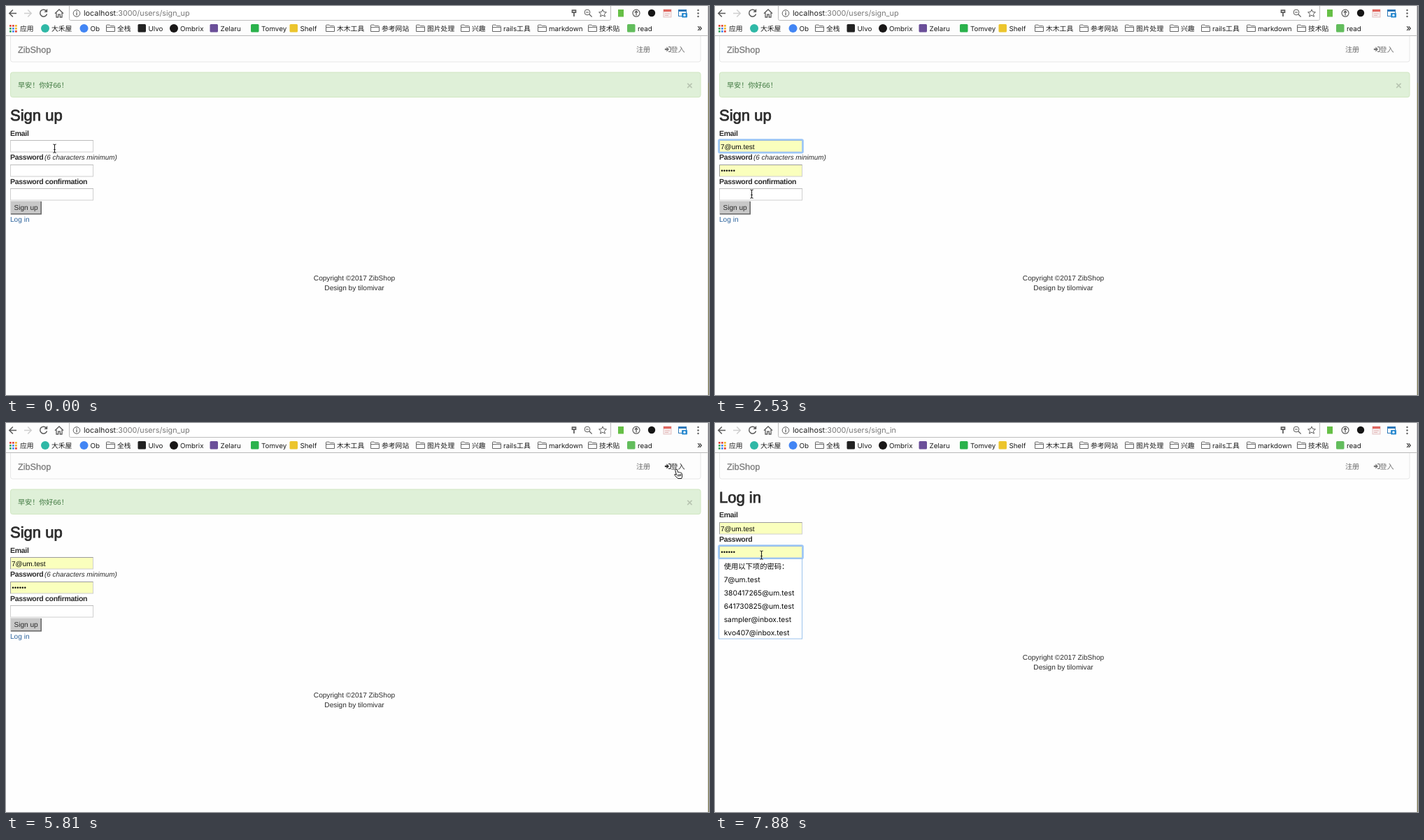
An HTML page that plays this animation: 1005x557 px, repeating every 8 s.

```html
<!DOCTYPE html>
<html lang="zh-CN">
<head>
<meta charset="utf-8">
<title>Sign up and log in</title>
<style>
  html, body { margin: 0; width: 100%; height: 100%; overflow: hidden; background: #fefefe; }
  svg { display: block; width: 100%; height: 100%; }
  text { font-family: "Liberation Sans", "Noto Sans CJK SC", "Noto Sans CJK", sans-serif; font-size: 10.1px; fill: #2b2b2b; white-space: pre; text-rendering: geometricPrecision; }
  .ui { font-family: Inter, "Noto Sans CJK SC", "Noto Sans CJK", sans-serif; font-size: 9.8px; fill: #1a1a1a; }
  .url { font-size: 10.8px; fill: #777; }
  .menu { font-size: 10.3px; fill: #0a0a0a; }
  .bold { font-weight: 700; }
  .label { font-weight: 700; font-size: 10.5px; letter-spacing: -.28px; }
  .hint { font-style: italic; font-size: 9.9px; }
  .title { font-size: 22px; stroke: #2b2b2b; stroke-width: .8px; }
  .brand { font-size: 12.7px; fill: #777; stroke: #777; stroke-width: .25px; }
  .link { fill: #2c639c; }
  .field { font-size: 10px; fill: #0a0a0a; }
</style>
</head>
<body>
<svg viewBox="0 0 1005 557" xmlns="http://www.w3.org/2000/svg">
  <g id="page"></g>
  <g id="chrome"></g>
  <g id="url"></g>
  <g id="overlay"></g>
</svg>
<script>
const LOOP = 8000;
const SHOP = 'ZibShop';
const USERS = ['7@um.test', '380417265@um.test', '641730825@um.test', 'sampler@inbox.test', 'kvo407@inbox.test'];

const rect = (x, y, w, h, fill, extra = '') =>
  `<rect x="${x}" y="${y}" width="${w}" height="${h}" fill="${fill}" ${extra}/>`;
const circle = (x, y, r, fill, extra = '') =>
  `<circle cx="${x}" cy="${y}" r="${r}" fill="${fill}" ${extra}/>`;
const line = (d, color, width = 1, fill = 'none') =>
  `<path d="${d}" fill="${fill}" stroke="${color}" stroke-width="${width}"/>`;
const text = (x, y, str, cls = '', extra = '') =>
  `<text x="${x}" y="${y}" class="${cls}" ${extra}>${str}</text>`;
const centred = (y, str) => text(498, y, str, '', 'text-anchor="middle"');

// ---- Browser frame ----
const BOOKMARKS = [
  [5, 'apps', '应用'], [50, 'round #2fb8a6', '大禾屋'], [105.5, 'round #4285f4', 'Ob'],
  [143, 'folder', '全栈'], [188.5, 'square #222', 'Ulvo'], [234, 'round #191717', 'Ombrix'],
  [291.5, 'square #6b4f99', 'Zelaru'], [350, 'square #2bb24c', 'Tomvey'], [405.5, 'square #ecc52d', 'Shelf'],
  [457, 'folder', '木木工具'], [521, 'folder', '参考网站'], [586, 'folder', '图片处理'],
  [650, 'folder', '兴趣'], [695, 'folder', 'rails工具'], [760, 'folder', 'markdown'],
  [832, 'folder', '技术贴'], [888, 'square #62bd5c', 'read'],
];

function appGrid(x) {
  const colors = ['#e0453a', '#e0453a', '#f0b429', '#38a55a', '#4285f4', '#f0b429', '#38a55a', '#4285f4', '#e0453a'];
  return colors.map((c, i) => rect(x + i % 3 * 4, 27 + Math.floor(i / 3) * 4, 2.7, 2.7, c)).join('');
}

function bookmark([x, kind, label]) {
  const [shape, color] = kind.split(' ');
  const icon = {
    apps: () => appGrid(x),
    round: () => circle(x + 6, 32, 6, color),
    square: () => rect(x, 26, 11.5, 11.5, color, 'rx="1.5"'),
    folder: () => line(`M${x + .5} 36.5V28q0-.9 .9-.9h3.6l1.3 1.4h5.2q1 0 1 1v7zM${x + .5} 30.6h12`, '#666'),
  }[shape]();
  return icon + text(x + (shape === 'folder' ? 16 : 15), 35.7, label, 'ui');
}

function browser() {
  const dark = '#5a5a5a';
  return rect(0, 0, 1005, 42, '#fdfdfd') + rect(0, 42, 1005, 1, '#b9b9b9') +
    rect(90.5, -3, 774, 23.5, '#fff', 'stroke="#bdbdbd" rx="2"') +
    line('M15 10.5H5M9.8 5.5l-5 5 5 5', dark, 1.5) +
    line('M26 10.5h10M31.2 5.5l5 5-5 5', '#cfcfcf', 1.5) +
    line('M57.8 7.3A5 5 0 1 0 58.5 11.5', dark, 1.5) + line('M59 4.5v4.2h-4.2z', dark, .4, dark) +
    line('M70 10.8l6-5.8 6 5.8M72 9.8v6.2h2.7v-3.8h2.6v3.8H80V9.8', dark, 1.3) +
    circle(101, 10.5, 4.8, 'none', `stroke="${dark}"`) + rect(100.4, 9.5, 1.3, 3.8, dark) + rect(100.4, 7.4, 1.3, 1.3, dark) +
    line('M809.5 6.2h5v3h-5zM812 9.5V15', dark, 1.7) +
    circle(831, 9, 3.9, 'none', `stroke="${dark}"`) + line('M829 9h4M834 12l3.7 3.7', dark, 1.2) +
    line('M853 5l1.6 3.5 3.8 .4-2.9 2.5 .9 3.8-3.4-2-3.4 2 .9-3.8-2.9-2.5 3.8-.4z', dark) +
    rect(875, 5, 8, 10.5, '#65bf45') +
    circle(901, 10.2, 5, 'none', `stroke="${dark}" stroke-width="1.2"`) + line('M901 13.5V7.3M898.8 9.5l2.2-2.3 2.2 2.3', dark, 1.3) +
    circle(923, 10, 5.2, '#151515') +
    rect(940, 5, 11, 11, '#f7eeee', 'stroke="#dfb6b6" stroke-width=".8"') + rect(940, 5, 11, 3.2, '#e0665f') + line('M942 11h7M942 13.5h5', '#dfa9a9', .8) +
    rect(961.5, 5.5, 11, 9, '#fff', 'stroke="#2c78b8"') + rect(961, 5, 12, 3, '#2c78b8') + rect(966, 10, 8, 6.5, '#2c8bd0', 'rx="1"') + circle(970, 13.2, 1.6, '#fff') +
    [6, 10.5, 15].map(y => circle(989.5, y, 1.2, dark)).join('') +
    BOOKMARKS.map(bookmark).join('') + text(988, 36, '»', 'ui', 'style="font-size:13px"') +
    rect(1003, 0, 1, 557, '#c6c6c6') + rect(1004, 0, 1, 110, '#77777c') + rect(1004, 110, 1, 447, '#807b50');
}

const address = last =>
  text(111, 14.3, `<tspan fill="#222">localhost</tspan>:3000/users/${last}`, 'ui url');

// ---- Page parts ----
function navbar(hover) {
  const c = hover ? '#333' : '#777';
  return line('M6.5 43V77q0 3 3 3H990q3 0 3-3V43', '#e7e7e7', 1, '#fdfdfd') +
    text(17, 66.8, SHOP, 'brand') + text(901, 65.7, '注册', '', 'style="fill:#666"') +
    line('M947 58.6h2.3q1 0 1 1v4.8q0 1-1 1H947', c, 1.1) +
    line('M942 61h2.6v-2.2l3.3 3.2-3.3 3.2V63H942z', c, .3, c) +
    text(950.5, 65.7, '登入', '', `style="fill:${c}"`);
}

const notice = () =>
  rect(6.5, 95, 986.5, 35.5, '#dff0d8', 'stroke="#d0e6c2" rx="3"') +
  text(17, 116.8, '早安！你好66！', '', 'style="fill:#3c763d"') +
  text(977.5, 118.5, '×', 'bold', 'text-anchor="middle" style="font-size:15px;fill:#b7c4b1"');

function input(y, { value = '', filled, focus, selected, caret } = {}) {
  let out = rect(6.5, y + .5, 118, 16.5, filled ? '#faffbd' : '#fff', 'stroke="#cfcfcf"');
  if (filled) out += line(`M6.5 ${y + 17}V${y + .5}H124.5`, '#9c9c9c');
  else out += line(`M6 ${y + .5}H125`, '#bcbcbc');
  if (focus) out += rect(5.5, y - .5, 120, 18.5, 'none', 'stroke="#9cc6f6" stroke-width="2.6" rx="1.5"');
  if (selected) out += rect(8, y + 3, 48, 12, '#b4d7e0');
  if (value === 'dots') for (let i = 0; i < 6; i++) out += circle(10 + i * 3.45, y + 8.8, 1.25, '#111');
  else if (value) out += text(8, y + 12.6, value, 'field');
  if (caret) out += rect(8, y + 3, 1, 12, '#222');
  return out;
}

const button = (y, w, str) =>
  rect(6, y, w, 19.5, '#c8c8c8') +
  line(`M6.5 ${y + 19}V${y + .5}H${6 + w}`, '#dcdcdc') +
  line(`M7 ${y + 18.7}H${5.2 + w}V${y + 1}`, '#6b6b6b', 1.6) +
  text(11.5, y + 13.4, str);

const footer = y => centred(y, `Copyright ©2017 ${SHOP}`) + centred(y + 13.5, 'Design by tilomivar');

function signUp(email, pass, confirm) {
  return notice() + text(6, 164.3, 'Sign up', 'title') +
    text(6, 185.5, 'Email', 'label') + input(192, email) +
    text(6, 220.2, 'Password', 'label') + text(55, 220.2, '(6 characters minimum)', 'hint') + input(227, pass) +
    text(6, 254.9, 'Password confirmation', 'label') + input(261, confirm) +
    button(279, 45, 'Sign up') + text(6, 309, 'Log in', 'link') + footer(393.4);
}

function logIn(email, pass) {
  return text(6, 113.6, 'Log in', 'title') +
    text(6, 135.1, 'Email', 'label') + input(142, email) +
    text(6, 169.8, 'Password', 'label') + input(176, pass) +
    rect(6.5, 198, 7.5, 7.5, '#f4f4f4', 'stroke="#adadad" rx="1.5"') + text(17, 204.5, 'Remember me', 'label') +
    button(211, 39, 'Log in') + text(6, 241.2, 'Sign up', 'link') +
    text(6, 254.8, 'Forgot your password?', 'link') + footer(339);
}

function menu(y, { bold, active = -1 }) {
  const rows = bold ? USERS : ['使用以下项的密码：', ...USERS];
  const w = bold ? 125 : 119;
  return rect(5.5, y + .5, w, rows.length * 19 + .5, '#fff', 'stroke="#9cc3ec"') +
    rows.map((r, i) => (i === active ? rect(6, y + 1 + i * 19, w - 1, 19, '#aed3fb') : '') +
      text(12.7, y + 14.9 + i * 18.95, r, 'ui menu' + (bold ? ' bold' : ''))).join('');
}

// ---- Pointer ----
const POINTERS = {
  arrow: line('M0 0V11.6l2.7-2.5 2 4.6 2-.9-2-4.4h3.7z', '#fff', .9, '#000'),
  beam: line('M-2.2-6q2.2 0 2.2 1.3V5q0 1.2-2.2 1.2M2.2-6Q0-6 0-4.7V5q0 1.2 2.2 1.2M-1.3 1.5h2.6', '#222', 1.1),
  hand: line('M2.3 .6q1.3-.5 1.8 .8L5.3 5q1.1-.7 1.9 .1 1.2-.5 1.8 .4 1.3-.2 1.7 1l.6 3q.2 2-.9 4.3H5.2L1.2 9.8Q0 8.3 .7 7.8q.9-.5 2.5 1L1.4 2Q1.2 1 2.3 .6zM5.4 8v3M7.3 7.7v3M9.1 7.4v3', '#111', 1, '#fff'),
};

// step, x, y, shape
const PATH = [
  [0, 69.5, 204, 'beam'], [2, 69.5, 204, 'beam'], [5, 69, 212, 'arrow'], [7, 69, 214.5, 'arrow'],
  [8, 64, 216, 'arrow'], [9, 63, 216, 'arrow'], [11, 63, 216, 'arrow'], [13, 60, 234, 'beam'],
  [15, 55, 250, 'arrow'], [16, 53, 264, 'beam'], [17, 52.5, 269, 'beam'], [20, 52.5, 269, 'beam'],
  [21, 330, 255, 'arrow'], [22, 605, 229.5, 'arrow'], [24, 640, 215, 'arrow'], [26, 880, 92, 'arrow'],
  [27, 945, 67, 'hand'], [28, 941, 67, 'hand'], [30, 941, 67, 'hand'], [31, 926, 70, 'hand'],
  [32, 820, 120, 'arrow'], [35, 163, 288, 'arrow'], [37, 850, 92, 'arrow'], [38, 955, 66, 'hand'],
  [41, 956, 65, 'hand'], [42, 880, 82, 'arrow'], [45, 140, 140, 'arrow'], [46, 66.5, 152, 'beam'],
  [47, 66.5, 168, 'arrow'], [48, 66.5, 186, 'beam'], [50, 60, 220, 'arrow'], [51, 60, 222, 'arrow'],
  [52, 66, 199, 'arrow'], [53, 66.5, 189, 'beam'],
];

function pointerAt(step) {
  const i = PATH.findLastIndex(p => p[0] <= step);
  const a = PATH[i], b = PATH[i + 1] || a;
  const k = b === a ? 0 : (step - a[0]) / (b[0] - a[0]);
  return { x: a[1] + (b[1] - a[1]) * k, y: a[2] + (b[2] - a[2]) * k, kind: a[3] };
}

// ---- Timeline: the screen refreshes in steps of about 150 ms ----
const SLIPS = [[5, 20], [35, 20], [41, 20], [53, 10]];
const startOf = step => SLIPS.reduce((t, [at, ms]) => step >= at ? t - ms : t, step * 150);
const LAST = 53;

function stepAt(ms) {
  let step = LAST;
  while (step && startOf(step) > ms) step--;
  return step;
}

const page = document.getElementById('page');
const url = document.getElementById('url');
const overlay = document.getElementById('overlay');
document.getElementById('chrome').innerHTML = browser();

function draw(step) {
  const within = (a, b) => step >= a && step < b;
  const blink = (step + 2) % 7 < 3;
  const p = pointerAt(step);
  const login = step >= 40;
  let body, list = '';
  if (!login) {
    const preview = within(5, 11), done = step >= 11;
    const email = { value: preview || done ? USERS[0] : '', filled: preview || done, selected: preview,
      focus: within(1, 18), caret: within(1, 5) && blink };
    const focusConfirm = within(18, 24);
    body = signUp(email, { value: done ? 'dots' : '', filled: done }, { focus: focusConfirm, caret: focusConfirm && blink });
    if (within(2, 11)) list = menu(210, { bold: true, active: preview ? 0 : -1 });
    if (focusConfirm) list = menu(280, {});
  } else {
    const filled = step >= 50, onPass = step >= 48;
    body = logIn(
      { value: filled ? USERS[0] : '', filled, focus: !onPass, caret: !onPass && blink },
      { value: filled ? 'dots' : '', filled, focus: onPass, caret: within(48, 50) && blink });
    if (within(48, 51) || step >= 53) list = menu(194, { active: step === 50 ? 1 : -1 });
  }
  page.innerHTML = navbar(p.kind === 'hand') + body;
  url.innerHTML = address(login ? 'sign_in' : 'sign_up');
  overlay.innerHTML = list + `<g transform="translate(${p.x} ${p.y})">${POINTERS[p.kind]}</g>`;
}

const begin = performance.now();
let shown = -1;
function tick() {
  const step = stepAt((performance.now() - begin) % LOOP);
  if (step !== shown) draw(shown = step);
  requestAnimationFrame(tick);
}
tick();
</script>
</body>
</html>
```
